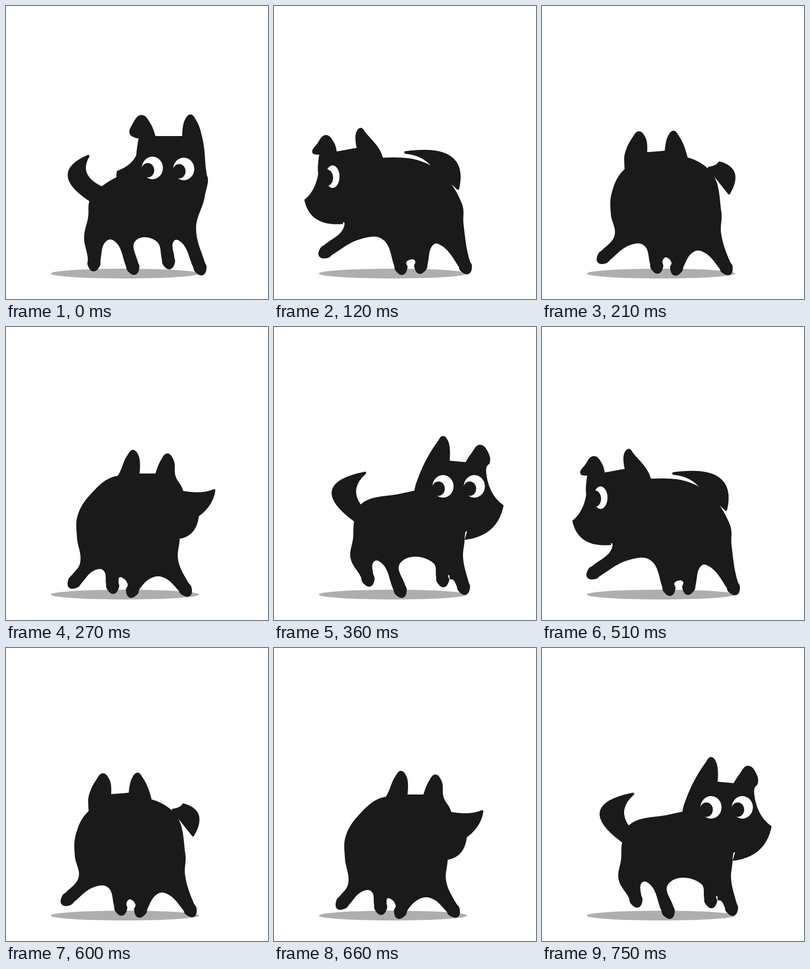
Animation of 510x570 px, one loop 780 ms. Source, as an HTML page with a canvas:

```html
<!DOCTYPE html>
<html lang="en">
<head>
<meta charset="utf-8">
<title>Spinning dog</title>
<style>
  html, body { margin: 0; width: 100%; height: 100%; overflow: hidden; background: #fff; }
  canvas { display: block; }
</style>
</head>
<body>
<canvas id="stage" width="510" height="570"></canvas>
<script>
const ctx = document.getElementById('stage').getContext('2d');
const INK = '#1a1a1a', STEP = 30, STEPS = 13, FOOT = 12.3;

// back: left flank over the spine to the right flank
// hips: right, left; feet and gaps between them [x, y, width] go right to left
// ears: outer base, tip centre, tip radius, inner base
// muzzle: bridge, nose, jaw control, neck
// tail: outer base, outer control, tip, inner control, inner base
const front = {
  at: 0,
  back: [[160, 410], [163, 378], [186, 351], [255, 320], [388, 325], [387, 370]],
  hips: [[370, 432], [152, 450]],
  feet: [[379, 512], [317, 500], [248, 511], [171, 504]],
  gaps: [[332, 456, 8], [272, 457, 40], [203, 456, 12]],
  ears: [[241, 249, 264, 230, 18, 291, 253], [382, 256, 359, 222, 11, 343, 253]],
  face: [[388, 305], [388, 360], [350, 400], [270, 385], [258, 258]],
  muzzle: [[258, 275], [216, 321], [208, 352], [250, 360]],
  tail: [[164, 378], [83, 325], [160, 292], [138, 330], [185, 353]]
};
const left = {
  at: 4,
  back: [[128, 400], [130, 360], [150, 310], [212, 295], [306, 311], [366, 385]],
  hips: [[369, 425], [137, 427]],
  feet: [[374, 510], [285, 509], [248, 511], [98, 480]],
  gaps: [[316, 463, 8], [269, 493, 4], [190, 453, 40]],
  ears: [[75, 286, 101, 268, 17, 122, 283], [212, 295, 169, 246, 9, 161, 276]],
  face: [[205, 370], [180, 410], [120, 415], [86, 325], [88, 289]],
  muzzle: [[88, 310], [59, 377], [70, 430], [135, 424]],
  tail: [[358, 355], [378, 268], [256, 285], [288, 288], [306, 308]]
};
const rear = {
  at: 9,
  back: [[138, 408], [139, 368], [165, 325], [215, 290], [335, 320], [338, 412]],
  hips: [[335, 453], [144, 460]],
  feet: [[351, 513], [245, 515], [208, 507], [131, 498]],
  gaps: [[296, 487, 20], [223, 487, 4], [181, 473, 16]],
  ears: [[219, 287, 247, 250, 11, 260, 285], [330, 290, 314, 258, 12, 291, 285]],
  face: [[345, 320], [330, 390], [240, 390], [215, 340], [208, 300]],
  muzzle: [[335, 300], [376, 350], [378, 405], [338, 412]],
  tail: [[368, 370], [400, 350], [405, 318], [378, 329], [338, 320]]
};
const right = {
  at: 12,
  back: [[154, 410], [156, 378], [168, 346], [230, 327], [370, 330], [371, 414]],
  hips: [[368, 448], [149, 450]],
  feet: [[370, 509], [329, 494], [247, 515], [184, 493]],
  gaps: [[345, 491, 4], [278, 459, 64], [200, 456, 10]],
  ears: [[277, 303, 329, 222, 10, 342, 260], [420, 264, 401, 246, 17, 373, 263]],
  face: [[414, 272], [414, 300], [390, 390], [290, 380], [272, 326]],
  muzzle: [[412, 275], [447, 347], [435, 407], [371, 414]],
  tail: [[157, 376], [63, 307], [177, 284], [143, 314], [167, 347]]
};

// Eye: x, y, white radius, pupil dx, pupil dy, pupil rx, pupil ry
const eye = (x, y) => [x, y, 20.5, -9, 4.5, 12.5, 14];
const side = x => [x, 332, 13.5, -11, 2, 12, 16];
const spans = [
  { from: front, to: left, lift: -25, push: 0, eyes: [[eye(285, 315), side(40)], [eye(346, 317), side(114)]] },
  { from: left, to: rear, lift: 0, push: 0, eyes: [[side(114), side(-60)]] },
  { from: rear, to: right, lift: 0, push: 37, eyes: [[eye(430, 315), eye(329, 310)], [eye(491, 315), eye(390, 310)]] }
];

const mix = (a, b, u) => Array.isArray(a) ? a.map((v, i) => mix(v, b[i], u)) : a + (b - a) * u;

function unit(a, b) {
  const x = b[0] - a[0], y = b[1] - a[1], d = Math.hypot(x, y) || 1;
  return [x / d, y / d];
}

// Smooth closed curve through the points; listed corners stay sharp.
function curve(p, corners = []) {
  const n = p.length, path = new Path2D();
  const dir = p.map((c, i) => {
    if (corners.includes(i)) return [0, 0];
    const a = unit(p[(i + n - 1) % n], c), b = unit(c, p[(i + 1) % n]);
    return unit([0, 0], [a[0] + b[0], a[1] + b[1]]);
  });
  path.moveTo(...p[0]);
  p.forEach((a, i) => {
    const j = (i + 1) % n, b = p[j], k = Math.hypot(b[0] - a[0], b[1] - a[1]) * 0.36;
    path.bezierCurveTo(a[0] + dir[i][0] * k, a[1] + dir[i][1] * k,
      b[0] - dir[j][0] * k, b[1] - dir[j][1] * k, ...b);
  });
  path.closePath();
  return path;
}

// Each leg points from the middle of its two hips to a round foot.
function bodyPath({ back, hips, feet, gaps }) {
  const p = [...back, hips[0]];
  let a = hips[0];
  feet.forEach((f, i) => {
    const g = gaps[i];
    const ends = g ? [[g[0] + g[2] / 2, g[1]], [g[0] - g[2] / 2, g[1]]] : [hips[1]];
    const [x, y] = unit(mix(a, ends[0], 0.5), f);
    const at = (along, across) =>
      [f[0] + FOOT * (x * along + y * across), f[1] + FOOT * (y * along - x * across)];
    p.push(at(-0.8, 1), at(0, 1), at(1, 0), at(0, -1), at(-0.8, -1), ...ends);
    a = ends[ends.length - 1];
  });
  return curve(p);
}

function headPath({ ears, face }) {
  const ear = ([ox, oy, x, y, r, ix, iy], s) =>
    [[ox, oy], [x - r * s, y], [x, y - r], [x + r * s, y], [ix, iy]];
  return curve([...ear(ears[0], 1), ...ear(ears[1], -1).reverse(), ...face], [4, 5, 14]);
}

function muzzlePath([bridge, nose, jaw, neck]) {
  const path = new Path2D();
  path.moveTo(...bridge);
  path.quadraticCurveTo(mix(bridge[0], nose[0], 0.1), mix(bridge[1], nose[1], 0.7), ...nose);
  path.quadraticCurveTo(...jaw, ...neck);
  return path;
}

function tailPath([outer, bend, tip, fold, inner]) {
  const path = new Path2D();
  path.moveTo(...outer);
  path.quadraticCurveTo(...bend, ...tip);
  path.quadraticCurveTo(...fold, ...inner);
  path.closePath();
  return path;
}

function oval(x, y, rx, ry, color) {
  ctx.fillStyle = color;
  ctx.beginPath();
  ctx.ellipse(x, y, rx, ry, 0, 0, Math.PI * 2);
  ctx.fill();
}

function drawEye([x, y, r, dx, dy, rx, ry]) {
  oval(x, y, r, 22, '#fff');
  oval(x + dx, y + dy, rx, ry, INK);
}

function draw(step) {
  const { from, to, lift, push, eyes } = spans.find(s => step <= s.to.at);
  const u = (step - from.at) / (to.at - from.at);
  const swing = Math.sin(Math.PI * u), dx = push * swing, dy = lift * swing;
  const dog = {};
  for (const part in from) dog[part] = mix(from[part], to[part], u);
  const head = headPath(dog), tail = tailPath(dog.tail);

  ctx.fillStyle = '#fff';
  ctx.fillRect(0, 0, 510, 570);
  oval(231.5, 520.5, 144.5, 9.5, '#aeaeae');

  ctx.fillStyle = ctx.strokeStyle = INK;
  ctx.lineWidth = 5;
  ctx.lineJoin = 'round';
  ctx.fill(tail);
  ctx.stroke(tail);
  ctx.fill(bodyPath(dog));

  ctx.save();
  ctx.translate(dx, dy);
  ctx.fill(muzzlePath(dog.muzzle));
  ctx.translate(dx / 3 - dx, 0);
  ctx.fill(head);
  ctx.clip(head);
  eyes.forEach(([a, b]) => drawEye(mix(a, b, u)));
  ctx.restore();
}

const start = performance.now();
function tick() {
  const t = Math.max(0, performance.now() - start);
  draw(Math.floor(t / STEP) % STEPS);
  requestAnimationFrame(tick);
}
tick();
</script>
</body>
</html>
```
